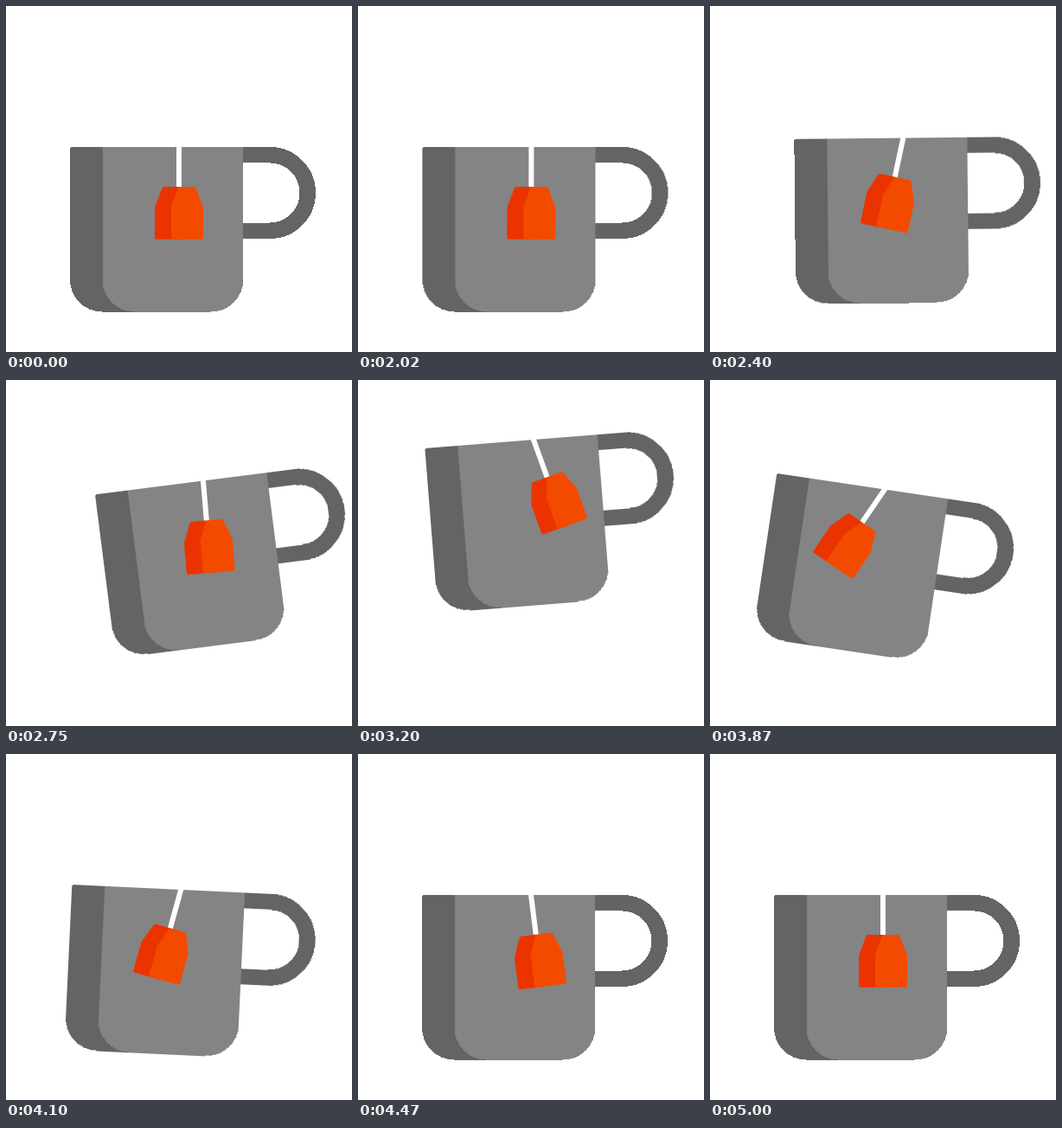
Write an HTML page without scripts that moves like this. It is 400x400 px and loops after 5200 ms.

```html
<!DOCTYPE html>
<html lang="en">
<head>
<meta charset="utf-8">
<title>Tea cup</title>
<style>
  html, body { margin: 0; width: 100%; height: 100%; overflow: hidden; background: #fff; }
  svg { display: block; width: 100vw; height: 100vh; }

  .dark, .light, .handle { shape-rendering: crispEdges; }
  .dark { fill: #646464; }
  .light { fill: #848484; }
  .handle { fill: none; stroke: #646464; stroke-width: 18.5; }
  .side { fill: #eb3300; }
  .front { fill: #f24b00; }

  .x, .y, .tilt, .swing {
    --sine: cubic-bezier(.37, 0, .63, 1);
    animation: 5.2s var(--sine) infinite;
  }
  .x { animation-name: x; }
  .y { animation-name: y; }
  .tilt { animation-name: tilt; transform-origin: 174px 258px; }
  .swing { animation-name: swing; transform-origin: 200px 163px; }

  @keyframes x {
    0% { transform: translateX(0); }
    38.46% { transform: translateX(0); animation-timing-function: cubic-bezier(.4, .1, .75, .95); }
    51.15% { transform: translateX(41.2px); }
    71.35% { transform: translateX(-17.3px); animation-timing-function: cubic-bezier(.3, .15, .6, 1); }
    81.73%, 100% { transform: translateX(0); }
  }
  @keyframes y {
    0% { transform: translateY(0); }
    38.46% { transform: translateY(0); animation-timing-function: cubic-bezier(.6, 0, .63, 1); }
    63.85% { transform: translateY(-94.3px); animation-timing-function: cubic-bezier(.48, 0, .67, 1); }
    81.73%, 100% { transform: translateY(0); }
  }
  @keyframes tilt {
    0%, 44.23% { transform: rotate(0deg); }
    55.38% { transform: rotate(-8.2deg); animation-timing-function: cubic-bezier(.42, 0, .6, 1); }
    74.23% { transform: rotate(8.5deg); }
    81.73%, 100% { transform: rotate(0deg); }
  }
  @keyframes swing {
    0%, 38.46% { transform: rotate(0deg); }
    47.12% { transform: rotate(13deg); }
    60.96% { transform: rotate(-15.5deg); }
    74.04% { transform: rotate(26deg); }
    85.19% { transform: rotate(-7.6deg); }
    91.15% { transform: rotate(3.2deg); }
    96.15%, 100% { transform: rotate(0deg); }
  }
</style>
</head>
<body>
<svg viewBox="0 0 400 400">
  <g class="x"><g class="y"><g class="tilt">
    <path class="handle" d="M270 172.2H305a43.8 43.8 0 0 1 0 87.6H270"/>
    <path class="dark" d="M76 163H150V353.5H111a37 37 0 0 1 -37 -37V165q0 -2 2 -2z"/>
    <path class="light" d="M111.5 163H274.3V316.5a37 37 0 0 1 -37 37H148.5a37 37 0 0 1 -37 -37z"/>
    <g class="swing">
      <path d="M200 160V212" stroke="#fff" stroke-width="6"/>
      <path class="side" d="M183 209H204V269.7H174q-2 0 -2 -2V233L180.3 211q.7 -2 2.7 -2z"/>
      <path class="front" d="M199.5 209H217q2 0 2.7 2L228 233V267.7q0 2 -2 2H191V232z"/>
    </g>
  </g></g></g>
</svg>
</body>
</html>
```
